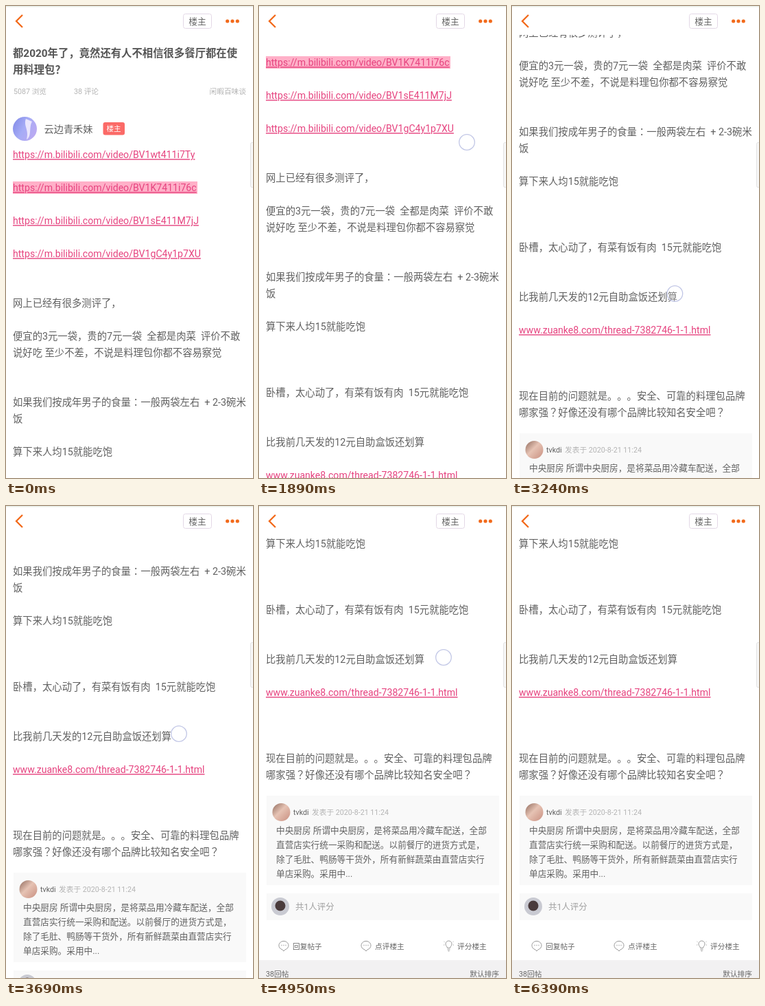
Write an HTML page that moves like this. It is 360x686 px and loops after 6480 ms.

```html
<!DOCTYPE html>
<html lang="zh-CN">
<meta charset="utf-8">
<style>
  html, body { margin: 0; width: 100%; height: 100%; overflow: hidden; background: #fff; }
  svg { display: block; width: 360px; height: 686px; }
  text { font-family: Roboto, 'Noto Sans CJK SC', sans-serif; white-space: pre; text-spacing-trim: space-all; }
  .mid { font-family: 'Noto Sans CJK TC', sans-serif; }
  .link { text-decoration: underline 1px; text-underline-offset: 1px; text-decoration-skip-ink: none; }
</style>
<svg id="stage" viewBox="0 0 360 686">
  <defs>
    <linearGradient id="sky" x1="0" y1="0" x2="1" y2=".5">
      <stop offset="0" stop-color="#7f88e6"/><stop offset=".55" stop-color="#a6acf6"/><stop offset="1" stop-color="#b9aaf2"/>
    </linearGradient>
    <linearGradient id="warm" x1="0" y1="0" x2="1" y2="1">
      <stop offset="0" stop-color="#8f6a5c"/><stop offset=".45" stop-color="#e6c3b4"/><stop offset="1" stop-color="#c98f80"/>
    </linearGradient>
  </defs>
  <g id="page"></g>
  <rect width="360" height="42" fill="#fff"/>
  <rect width="360" height="1.5" fill="#e9eee8"/>
  <path d="M24 13L15 22L24 31" fill="none" stroke="#f26a1b" stroke-width="2.3"/>
  <rect x="258.5" y="11.5" width="41" height="21" rx="3" fill="#fff" stroke="#e3d8e6"/>
  <g fill="#f26a1b"><circle cx="322.7" cy="22" r="2.6"/><circle cx="330" cy="22" r="2.6"/><circle cx="337.3" cy="22" r="2.6"/></g>
  <g id="bar"></g>
  <rect x="356.5" y="198.5" width="6" height="65" rx="2" fill="#f8f8f8" stroke="#e2e2e2"/>
  <circle id="touch" r="11.3" fill="#fff" fill-opacity=".2" stroke="#c2c7e6" stroke-width="1.3"/>
</svg>
<script>
const LOOP = 6480, STEP = 90;
const INK = '#606060', PINK = '#e6437f', PALE = '#b4b4b4';
const byId = id => document.getElementById(id);

// Text placed by its vertical centre.
const text = (x, y, size, fill, str, attrs = '') =>
  `<text x="${x}" y="${(y + size * .37).toFixed(2)}" font-size="${size}" fill="${fill}" ${attrs}>${str}</text>`;
const rect = (x, y, w, h, fill, rx = 0) =>
  `<rect x="${x}" y="${y}" width="${w}" height="${h}" rx="${rx}" fill="${fill}"/>`;
const disc = (x, y, r, fill) => `<circle cx="${x}" cy="${y}" r="${r}" fill="${fill}"/>`;
const mid = str => `<tspan class="mid" lang="zh-TW">${str}</tspan>`;
const body = (y, str) => text(10, y, 14.33, INK, str);
const link = (y, str) => text(10, y, 14.1, PINK, str, 'class="link"');
const title = (y, str) => text(10, y, 15.36, '#555', str, 'font-weight="700"');
const card = (y, h) => rect(11, y, 339, h, '#f9f9f9');
const END = 'text-anchor="end"', MIDDLE = 'text-anchor="middle"';

const bubble = x => `<g transform="translate(${x} 1231.5)" stroke="#999" fill="none">
  <path d="M-2 6.2A7 6.3 0 1 1 2 6.2L0 8.5Z"/>
  <path d="M-3.5 0h1M-.5 0h1M2.5 0h1" stroke-width="1.3"/></g>`;
const bulb = x => `<g transform="translate(${x} 1231)" stroke="#999" fill="none">
  <path d="M-2 4.5C-2 2-4.5 1.5-4.5-1.5A4.5 4.5 0 0 1 4.5-1.5C4.5 1.5 2 2 2 4.5ZM-2 6.8h4M-1 8.8h2"/>
  <path d="M-7 -5l1 .7M7 -5l-1 .7M-7.5 0h1.3M7.5 0h-1.3" stroke-width=".8"/></g>`;

const VIDEO = 'https://m.bilibili.com/video/';

byId('page').innerHTML = [
  title(68, '都2020年了，竟然还有人不相信很多餐厅都在使'),
  title(92, '用料理包？'),
  text(11, 124, 10.7, PALE, '5087 浏览'),
  text(99, 124, 10.7, PALE, '38 评论'),
  text(350, 124, 10.7, PALE, '闲暇百味谈', END),
  disc(27.5, 178.5, 17.5, 'url(#sky)'),
  '<path d="M29 164C25 174 34 180 30 194C38 190 33 176 38 168Z" fill="#eae6fd"/>',
  text(55.5, 178.5, 14.2, INK, '云边青禾妹'),
  rect(141.5, 169, 31.5, 18.5, '#fb6a67', 3),
  text(157, 178.5, 10.6, '#fff', '楼主', MIDDLE),
  link(216, VIDEO + 'BV1wt411i7Ty'),
  rect(10, 255, 269, 18, '#ffb0c8'),
  link(264, VIDEO + 'BV1K7411i76c'),
  link(312, VIDEO + 'BV1sE411M7jJ'),
  link(360, VIDEO + 'BV1gC4y1p7XU'),
  body(432, '网上已经有很多测评了，'),
  body(480, '便宜的3元一袋，贵的7元一袋  全都是肉菜  评价不敢'),
  body(504, '说好吃 至少不差，不说是料理包你都不容易察觉'),
  body(576, `如果我们按成年男子的食量${mid('：')}一般两袋左右  + 2-3碗米`),
  body(600, '饭'),
  body(648, '算下来人均15就能吃饱'),
  body(744, '卧槽，太心动了，有菜有饭有肉  15元就能吃饱'),
  body(816, '比我前几天发的12元自助盒饭还划算'),
  link(864, 'www.zuanke8.com/thread-7382746-1-1.html'),
  body(960, '现在目前的问题就是。。。安全、可靠的料理包品牌'),
  body(984, `哪家强${mid('？')}好像还没有哪个品牌比较知名安全吧${mid('？')}`),

  card(1014, 130),
  disc(32.5, 1038, 13, 'url(#warm)'),
  text(50, 1038.5, 10.7, INK, 'tvkdi'),
  text(77, 1038.5, 10.7, PALE, '发表于 2020-8-21 11:24'),
  ...['中央厨房 所谓中央厨房，是将菜品用冷藏车配送，全部',
    '直营店实行统一采购和配送。以前餐厅的进货方式是，',
    '除了毛肚、鸭肠等干货外，所有新鲜蔬菜由直营店实行',
    '单店采购。采用中...'].map((str, i) => text(25, 1064.5 + i * 20.8, 12.67, INK, str)),

  card(1156, 39),
  disc(31, 1175, 13, '#c9cad2'),
  disc(31, 1174, 7.5, '#4a3b3c'),
  text(53, 1175.5, 12.4, '#a0a0a0', '共1人评分'),
  bubble(36), text(49, 1233, 10.7, '#666', '回复帖子'),
  bubble(156), text(169, 1233, 10.7, '#666', '点评楼主'),
  bulb(276.5), text(289, 1233, 10.7, '#666', '评分楼主'),
  rect(0, 1253, 360, 40, '#f2f1f2'),
  text(10, 1273, 10.7, '#666', '38回帖'),
  text(350, 1273, 10.7, '#666', '默认排序', END),
].join('');
byId('bar').innerHTML = text(279, 22, 12.8, '#666', '楼主', MIDDLE);

// Keys are [time, ...values]; linear in between, held at both ends.
const scrollKeys = [[950, 0], [1170, 42], [1890, 182], [2610, 320], [2700, 337], [2950, 337], [3690, 481], [4280, 593]];
const drags = [
  [[900, 256, 375], [950, 256, 375], [1170, 267, 333], [1890, 303, 198], [2610, 331, 55], [2790, 335, 38]],
  [[2880, 228, 474], [2950, 228, 474], [3690, 252, 331], [4280, 269, 220], [5310, 269, 220]],
];

function sample(keys, t) {
  const i = keys.findIndex(k => k[0] > t);
  if (i < 0) return keys.at(-1).slice(1);
  if (i === 0) return keys[0].slice(1);
  const a = keys[i - 1], b = keys[i], p = (t - a[0]) / (b[0] - a[0]);
  return a.slice(1).map((v, j) => v + (b[j + 1] - v) * p);
}

function draw(now) {
  const t = Math.floor(now % LOOP / STEP) * STEP;
  const [scroll] = sample(scrollKeys, t);
  byId('page').setAttribute('transform', `translate(0 ${-Math.round(scroll)})`);

  const drag = drags.find(d => t >= d[0][0] && t < d.at(-1)[0]);
  const touch = byId('touch');
  touch.style.display = drag ? '' : 'none';
  if (drag) {
    const [x, y] = sample(drag, t);
    touch.setAttribute('cx', x);
    touch.setAttribute('cy', y);
  }
}

const start = performance.now();
(function tick() {
  draw(performance.now() - start);
  requestAnimationFrame(tick);
})();
</script>
</html>
```
